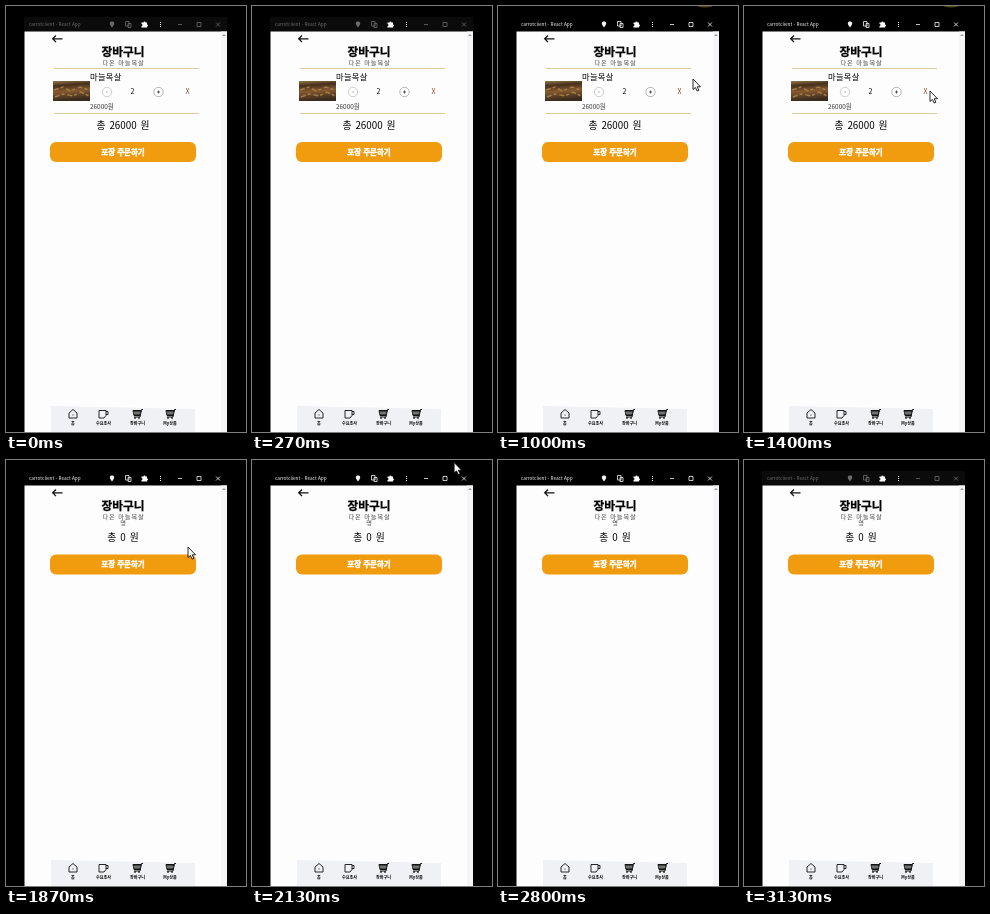
An HTML page for the animation above (3.19 s loop, 240 px wide and 426 px high).

```html
<!DOCTYPE html>
<html lang="ko">
<head>
<meta charset="utf-8">
<title>장바구니</title>
<style>
html, body { margin: 0; width: 100%; height: 100%; overflow: hidden; background: #000; }
svg { display: block; width: 240px; height: 426px; }
text { font-family: "Noto Sans CJK KR", "Noto Sans CJK JP", "Noto Sans CJK", sans-serif; }
.mid { text-anchor: middle; }
.line { fill: none; stroke: #111; }
.rule { stroke: #dccb9c; stroke-width: 1; }
.nav text { font-size: 4.1px; font-weight: 700; text-anchor: middle; }
</style>
</head>
<body>
<svg viewBox="0 0 240 426">
  <defs>
    <linearGradient id="food" x2=".15" y2="1">
      <stop offset="0" stop-color="#94794c"/>
      <stop offset=".25" stop-color="#46301c"/>
      <stop offset=".55" stop-color="#85592f"/>
      <stop offset="1" stop-color="#382a1d"/>
    </linearGradient>
    <g id="cart" class="line" stroke-width="1">
      <path d="M5.500-4.500h-1.500l-1.500 7.500h-6"/>
      <path d="M-4.500-3.500h8l-1 5h-6z" fill="#444"/>
      <path d="M-4-1h7" stroke="#ddd" stroke-width=".6"/>
      <circle cx="-2.500" cy="4" r=".5"/><circle cx="1.500" cy="4" r=".5"/>
    </g>
  </defs>

  <rect width="240" height="426"/>
  <rect id="bar" x="18" y="11" width="203" height="14"/>
  <g id="chrome" fill="none" stroke-width=".8">
    <text id="caption" x="23" y="20.300" font-size="4.700" stroke="none">carrotclient - React App</text>
    <path id="pin" d="M106 21.500c-5-6 0-6 0-6s5 0 0 6z" stroke="none"/>
    <path d="M119.500 15.500h3.500v4.500h-3.500zM122 17.500h3v4h-3z"/>
    <path d="M172 18.500h4M191 16.500h4v4h-4zM210 16.500l4 4m0-4l-4 4"/>
  </g>
  <g fill="#fff">
    <path d="M135.500 16.500h2a1 1 0 0 1 2 0h1.500v2a1 1 0 0 1 0 2v1h-5.500v-1.500a1 1 0 0 0 0-2z"/>
    <path d="M154 16h1v1h-1zm0 2h1v1h-1zm0 2h1v1h-1z"/>
  </g>

  <rect x="18.500" y="25.500" width="202.500" height="400.500" fill="#fdfdfd"/>
  <rect x="215" y="25.500" width="6" height="400.500" fill="#f5f5f7"/>
  <path d="M216 30l2-2 2 2z" fill="#999"/>

  <path class="line" stroke-width="1.300" d="M56.500 32.800H46.500m3.500-3.300l-3.300 3.300 3.300 3.300"/>
  <text class="mid" x="117" y="50" font-size="11.700" font-weight="700" stroke="#000" stroke-width=".25">장바구니</text>
  <text class="mid" x="117.500" y="58.500" font-size="6.200" letter-spacing=".9" fill="#444">다온 마늘목살</text>

  <g id="item">
    <path class="rule" d="M48 62.500H193M48 107.500H193"/>
    <rect x="47" y="75" width="37" height="20" fill="url(#food)"/>
    <path d="M48 84l9-3 7 4 10-4 9 3M49 91l8-3 10 2 8-4 8 4" fill="none" stroke="#a37a45" stroke-width="1.500" stroke-dasharray="5 2 3 3"/>
    <text x="84" y="73.500" font-size="8.300" letter-spacing=".3" font-weight="500">마늘목살</text>
    <g class="line" stroke-width=".7">
      <circle cx="101" cy="86" r="4.700" stroke="#bbb"/>
      <path d="M100 86h2" stroke="#999"/>
      <circle cx="152.500" cy="86" r="4.700" stroke="#999"/>
      <path d="M151 86h3m-1.500-1.500v3" stroke="#222"/>
    </g>
    <text class="mid" x="126.500" y="88.300" font-size="7" font-weight="500">2</text>
    <text class="mid" x="181.500" y="87.500" font-size="7" fill="#7c4b28">X</text>
    <text x="84" y="102.700" font-size="6.400" fill="#333">26000원</text>
  </g>
  <text id="wrap" class="mid" x="117" y="65" font-size="6.200" fill="#444">명</text>
  <g id="order">
    <text id="total" class="mid" x="117" y="122.500" font-size="9.800" word-spacing="1.200"></text>
    <rect x="44" y="136" width="146" height="20" rx="6" fill="#f09c0e"/>
    <text class="mid" x="117" y="148.800" font-size="7.500" font-weight="900" fill="#fff" stroke="#fff" stroke-width=".45">포장 주문하기</text>
  </g>

  <g class="nav">
    <path d="M45 400L189 403V426H45z" fill="#f0f1f4"/>
    <path class="line" stroke-width=".9" d="M63 412v-5l4-3.500 4 3.500v5zM66.500 409h1"/>
    <path class="line" stroke-width=".9" d="M93 404.500h7v5l-2 2.500h-5zM100 405.500h2v3h-2"/>
    <use href="#cart" x="131.500" y="408"/>
    <use href="#cart" x="164.500" y="408"/>
    <text x="67" y="419">홈</text>
    <text x="97.500" y="419">수요조사</text>
    <text x="131.500" y="419">장바구니</text>
    <text x="164" y="419">My상품</text>
  </g>

  <ellipse id="glow" cx="207" cy="-1" rx="8" ry="2.500" fill="#4c4712"/>
  <path id="cursor" d="M0 0v10.500l2.400-2 1.700 3.600 1.800-.8-1.700-3.500h3.300z" fill="#fff" stroke="#111" stroke-width=".9"/>
</svg>
<script>
const LOOP = 3190, ACTIVE = [800, 3000], GLOW = [530, 1670], REMOVED = 1670;
// Pointer path: time, x, y
const PATH = [
  [600, 206, -14], [930, 195, 73], [1040, 195, 73], [1300, 186, 85],
  [1600, 186, 85], [1800, 182, 87], [1930, 182, 87], [2200, 206, -14]
];
const $ = id => document.getElementById(id);
const show = (id, on) => $(id).setAttribute("visibility", on ? "visible" : "hidden");
const within = (t, [from, to]) => t >= from && t < to;
const ease = u => u * u * (3 - 2 * u);

function pointer(t) {
  const i = PATH.findIndex(p => p[0] > t);
  if (i <= 0) return PATH[0].slice(1);
  const [t0, x0, y0] = PATH[i - 1], [t1, x1, y1] = PATH[i];
  const u = ease((t - t0) / (t1 - t0));
  return [x0 + (x1 - x0) * u, y0 + (y1 - y0) * u];
}

function draw() {
  const t = performance.now() % LOOP;
  const active = within(t, ACTIVE);
  const empty = t >= REMOVED;
  const ink = active ? "#f4f4f4" : "#6c6c6c";
  $("bar").setAttribute("fill", active ? "#000" : "#0b0b0b");
  $("chrome").setAttribute("stroke", ink);
  $("caption").setAttribute("fill", ink);
  $("caption").setAttribute("font-weight", active ? 500 : 400);
  $("pin").setAttribute("fill", ink);
  show("item", !empty);
  show("wrap", empty);
  show("glow", within(t, GLOW));
  $("total").textContent = `총 ${empty ? 0 : 26000} 원`;
  $("order").setAttribute("transform", `translate(0 ${empty ? -41.5 : 0})`);
  $("cursor").setAttribute("transform", `translate(${pointer(t)})`);
  requestAnimationFrame(draw);
}
draw();
</script>
</body>
</html>
```
